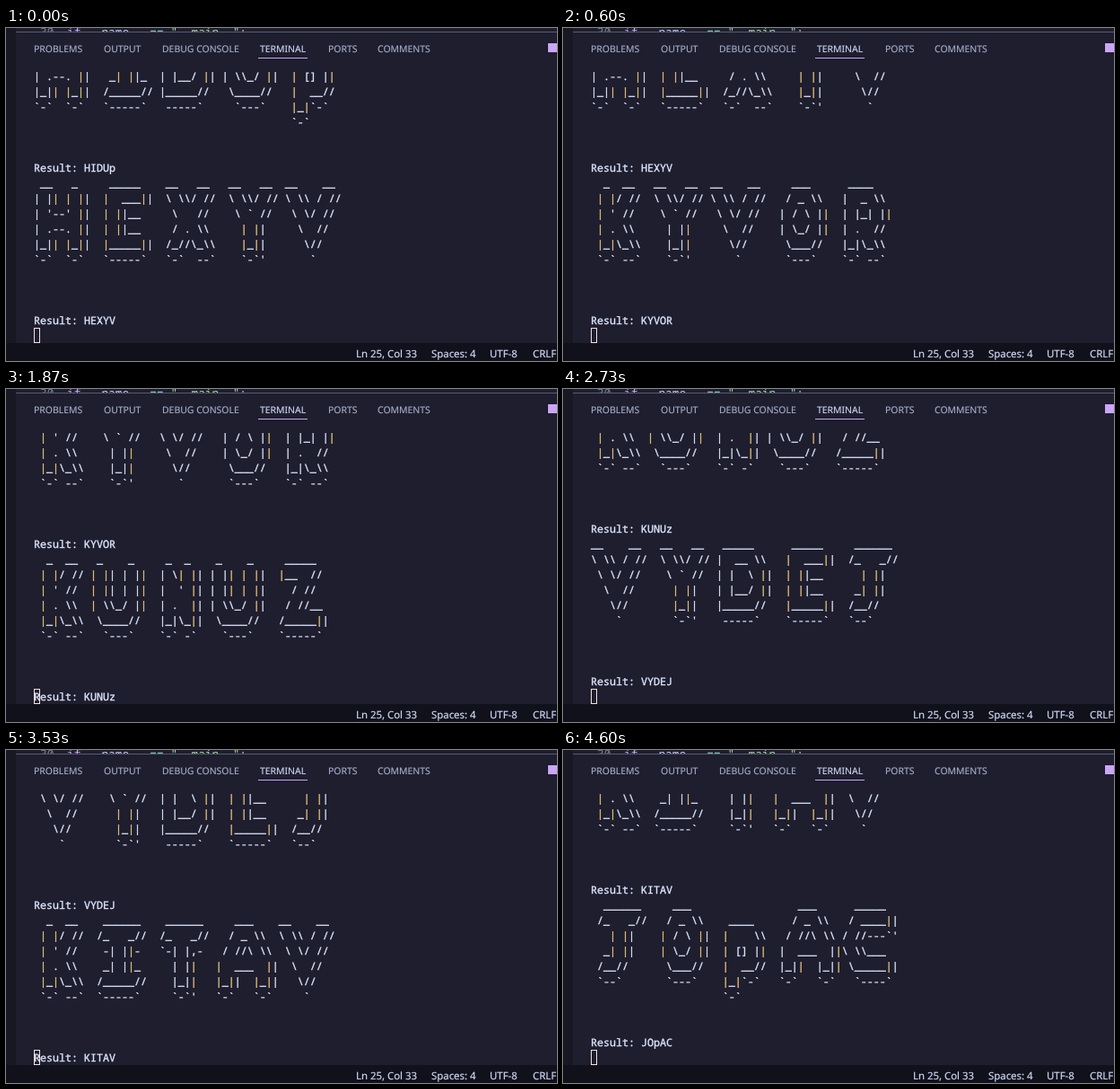
Animation of 614x371 px, one loop 5000 ms. Source, as an HTML page:

```html
<!DOCTYPE html>
<html lang="en">
<head>
<meta charset="utf-8">
<title>Terminal banner</title>
<style>
html, body { margin: 0; width: 100%; height: 100%; overflow: hidden; background: #1e1e2e; }
svg { display: block; width: 614px; height: 371px; }
text { white-space: pre; text-rendering: geometricPrecision; }
.mono { font-family: "Noto Sans Mono", "DejaVu Sans Mono", monospace; font-variant-ligatures: none; }
.term { font-size: 11.667px; fill: #dfe7ff; stroke: #dfe7ff; stroke-width: .35px; }
.bar { fill: #ecc67c; stroke: #ecc67c; }
.code { font-size: 12.83px; }
.ui { font-family: "Noto Sans", "Open Sans", sans-serif; }
.tab { font-size: 10.45px; fill: #a6adc8; stroke: #a6adc8; stroke-width: .15px; }
.on { fill: #cdd6f4; stroke: #cdd6f4; }
.status { font-size: 11.4px; fill: #cdd6f4; stroke: #cdd6f4; stroke-width: .2px; }
</style>
</head>
<body>
<svg viewBox="0 0 614 371">
  <clipPath id="editor"><rect x="11" width="603" height="4"/></clipPath>
  <rect width="614" height="371" fill="#1e1e2e"/>
  <rect width="11" height="351" fill="#181825"/>
  <g clip-path="url(#editor)">
    <text class="mono code" y="9" fill="#cdd6f4"><tspan x="38" fill="#7f849c">30</tspan><tspan x="68" fill="#cba6f7">if</tspan><tspan x="91">__name__ </tspan><tspan fill="#94e2d5">== </tspan><tspan fill="#a6e3a1">"__main__"</tspan>:</text>
  </g>
  <rect x="11" y="4" width="603" height="1" fill="#585b70"/>
  <g class="ui tab">
    <text x="31" y="27">PROBLEMS</text>
    <text x="109" y="27">OUTPUT</text>
    <text x="174" y="27">DEBUG CONSOLE</text>
    <text x="283" y="27" class="on">TERMINAL</text>
    <text x="359" y="27">PORTS</text>
    <text x="414" y="27">COMMENTS</text>
  </g>
  <rect x="281" y="33" width="55" height="1" fill="#cba6f7"/>
  <rect x="604" y="17" width="10" height="10" fill="#cba6f7"/>
  <g id="screen" class="mono term"></g>
  <rect x="31.5" y="334.5" width="6" height="16" fill="none" stroke="#f5e0dc"/>
  <rect y="351" width="614" height="20" fill="#11111b"/>
  <g class="ui status">
    <text x="390" y="367">Ln 25, Col 33</text>
    <text x="474" y="367">Spaces: 4</text>
    <text x="539" y="367">UTF-8</text>
    <text x="587" y="367">CRLF</text>
  </g>
</svg>
<script>
// Banner letters: rows split by ";", "^" stands for a backtick.
const raw = String.raw;
const LETTERS = {
  A: raw`   ___;  / _ \\; / //\ \\;|  ___  ||;|_||  |_||;^-^   ^-^`,
  C: raw`  _____; / ____||;/ //---^';\ \\___; \_____||;  ^----^`,
  D: raw` _____;|  __ \\;| |  \ ||;| |__/ ||;|_____//; -----^`,
  E: raw`  _____; |  ___||; | ||__; | ||__; |_____||; ^-----^`,
  H: raw` __   _;| || | ||;| '--' ||;| .--. ||;|_|| |_||;^-^  ^-^`,
  I: raw`  ______; /_   _//;  -| ||-;  _| ||_; /_____//; ^-----^`,
  J: raw`  ______; /_   _//;   | ||;  _| ||; /__//; ^--^`,
  K: raw`  _  __; | |/ //; | ' //; | . \\; |_|\_\\; ^-^ --^`,
  N: raw`  _  _; | \| ||; |  ' ||; | .  ||; |_|\_||; ^-^ -^`,
  O: raw`   ___;  / _ \\; | / \ ||; | \_/ ||;  \___//;  ^---^`,
  R: raw`  ____; |  _ \\; | |_| ||; | .  //; |_|\_\\; ^-^ --^`,
  T: raw`  ______; /_   _//; ^-| |,-;   | ||;   |_||;   ^-^'`,
  U: raw` _    _;| || | ||;| || | ||;| \\_/ ||; \____//;  ^---^`,
  V: raw`__    __;\ \\ / //; \ \/ //;  \  //;   \//;    ^`,
  X: raw` __   __; \ \\/ //;  \   //;  / . \\; /_//\_\\; ^-^  --^`,
  Y: raw` __   __; \ \\/ //;  \ ^ //;   | ||;   |_||;   ^-^'`,
  p: raw`;  ____; |    \\; | [] ||; |  __//; |_|^-^; ^-^`,
  z: raw`  _____; |__  //;   / //;  / //__; /_____||; ^-----^`
};
const WORDS = ["HIDUp", "HEXYV", "KYVOR", "KUNUz", "VYDEJ", "KITAV", "JOpAC"];
// [start ms, index of newest word, rows still to scroll]
const STEPS = [
  [0, 1, 0], [530, 2, 1], [600, 2, 0], [1870, 3, 1], [1930, 3, 0],
  [2730, 4, 0], [3530, 5, 1], [3600, 5, 0], [4600, 6, 0]
];
const LOOP = 5000, ROWS = 18, LEFT = 31, BASE = 58, LINE = 17;

function banner(word) {
  const rows = Array(7).fill("");
  for (const ch of word) {
    const glyph = LETTERS[ch].replaceAll("^", "`").split(";");
    const width = "KN".includes(ch) ? 9 : 10;
    rows.forEach((row, i) => rows[i] = row + (glyph[i] || "").padEnd(width));
  }
  return [...rows, "", "", "Result: " + word];
}

const screen = document.getElementById("screen");
function addLine(y, cls) {
  const el = document.createElementNS("http://www.w3.org/2000/svg", "text");
  el.setAttribute("x", LEFT);
  el.setAttribute("y", y);
  el.setAttribute("class", cls);
  return screen.appendChild(el);
}
const lines = Array.from({ length: ROWS }, (_, i) => {
  const y = BASE + i * LINE;
  return { ink: addLine(y, ""), bars: addLine(y, "bar") };
});

// Bars in odd columns take the warm tint.
const isWarm = (c, col) => c === "|" && col % 2 === 1;
const keep = (row, test) => [...row].map((c, i) => test(c, i) ? c : " ").join("");

let shown = null;
function draw(ms) {
  const step = STEPS.findLast(s => s[0] <= ms);
  if (step === shown) return;
  shown = step;
  const [, word, lag] = step;
  const rows = [...banner(WORDS[word - 1]), ...banner(WORDS[word])].slice(3 - lag);
  lines.forEach(({ ink, bars }, i) => {
    const row = rows[i] || "";
    ink.textContent = keep(row, (c, col) => !isWarm(c, col));
    bars.textContent = keep(row, isWarm);
  });
}

const start = performance.now();
function tick() {
  draw((performance.now() - start) % LOOP);
  requestAnimationFrame(tick);
}
tick();
</script>
</body>
</html>
```
